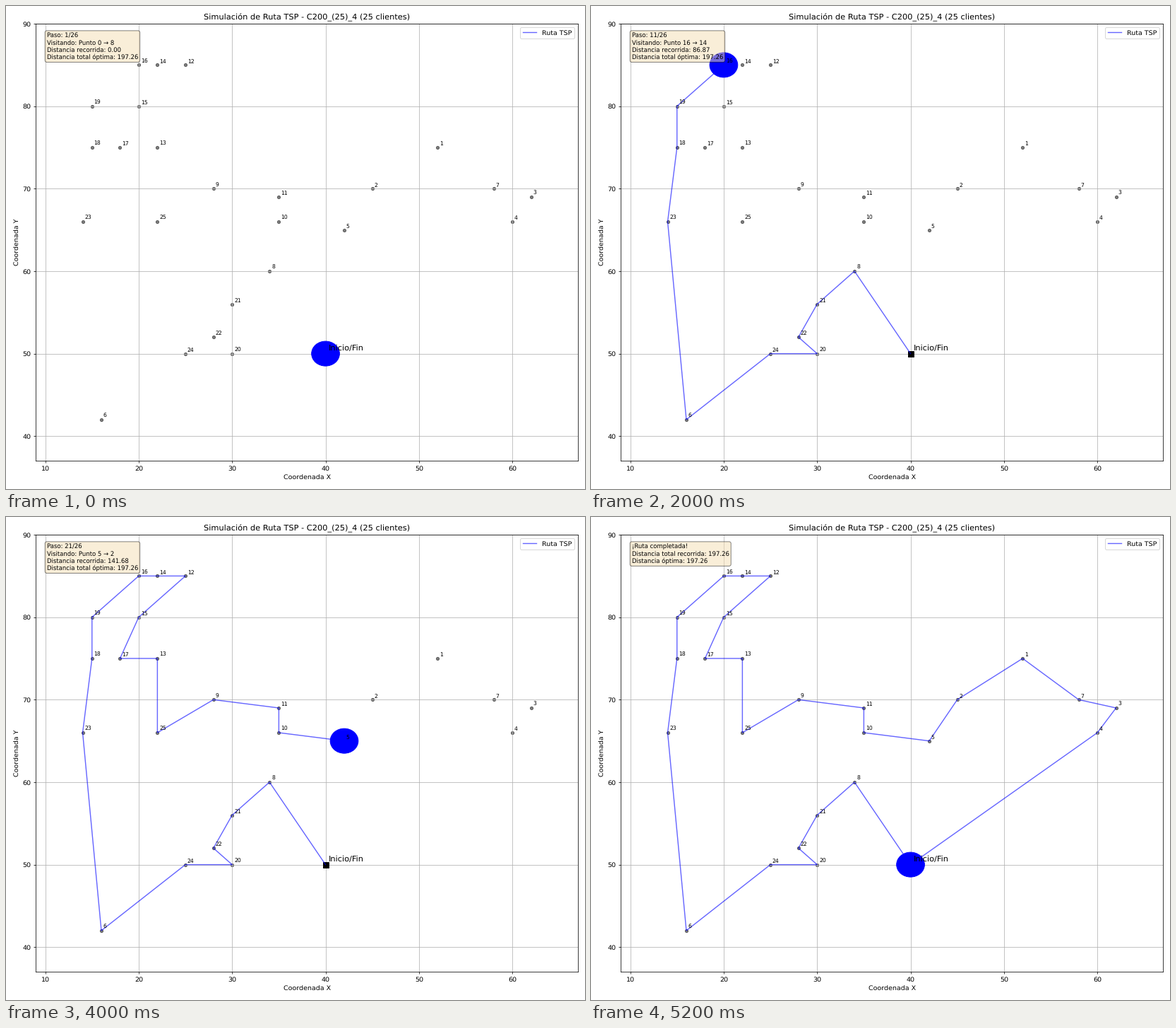
These frames come from a looping animation (820x683 px, 5400 ms). A matplotlib script:

```python
import numpy as np
import matplotlib.pyplot as plt
from matplotlib.animation import FuncAnimation
from matplotlib.patches import Circle

W, H = 820, 683
DPI = W / 12
STEP_MS = 200

# Index 0 is the depot, the rest are clients 1..25.
POINTS = np.array([
    (40, 50), (52, 75), (45, 70), (62, 69), (60, 66), (42, 65), (16, 42),
    (58, 70), (34, 60), (28, 70), (35, 66), (35, 69), (25, 85), (22, 75),
    (22, 85), (20, 80), (20, 85), (18, 75), (15, 75), (15, 80), (30, 50),
    (30, 56), (28, 52), (14, 66), (25, 50), (22, 66),
])
ROUTE = [0, 8, 21, 22, 20, 24, 6, 23, 18, 19, 16, 14, 12, 15,
         17, 13, 25, 9, 11, 10, 5, 2, 1, 7, 3, 4, 0]
PATH = POINTS[ROUTE]
LEGS = np.hypot(*np.diff(PATH, axis=0).T)
TRAVELLED = np.concatenate([[0], np.cumsum(LEGS)])
TOTAL = TRAVELLED[-1]
STEPS = len(LEGS)

plt.rcParams["font.family"] = "DejaVu Sans"
plt.rcParams["text.hinting"] = "none"

fig = plt.figure(figsize=((W + 0.01) / DPI, (H + 0.01) / DPI), dpi=DPI)
left, right, top, bottom = 42.4, 809.76, 25.1, 643.2
ax = fig.add_axes([left / W, 1 - bottom / H, (right - left) / W, (bottom - top) / H])
ax.set(xlim=(9, 67), ylim=(37, 90), xlabel="Coordenada X", ylabel="Coordenada Y")
ax.set_title("Simulación de Ruta TSP - C200_(25)_4 (25 clientes)")
ax.grid(True)


def label(text, xy, offset, size):
    ax.annotate(text, xy, xytext=(offset, offset),
                textcoords="offset points", fontsize=size)


ax.scatter(*POINTS[1:].T, c="black", s=20, alpha=0.5)
for i, xy in enumerate(POINTS[1:], 1):
    label(str(i), xy, 3, 8)
ax.plot(*POINTS[0], "ks", markersize=8)
label("Inicio/Fin", POINTS[0], 5, 12)

line, = ax.plot([], [], "b-", lw=1.5, alpha=0.6, label="Ruta TSP")
vehicle = ax.add_patch(Circle(PATH[0], 1.5, color="blue", zorder=2.5))
info = ax.text(0.02, 0.98, "", transform=ax.transAxes, va="top", fontsize=9,
               bbox=dict(boxstyle="round", facecolor="wheat", alpha=0.5))
ax.legend(loc="upper right")


def status(k):
    if k == STEPS:
        return ("¡Ruta completada!\n"
                f"Distancia total recorrida: {TOTAL:.2f}\n"
                f"Distancia óptima: {TOTAL:.2f}")
    return (f"Paso: {k + 1}/{STEPS}\n"
            f"Visitando: Punto {ROUTE[k]} → {ROUTE[k + 1]}\n"
            f"Distancia recorrida: {TRAVELLED[k]:.2f}\n"
            f"Distancia total óptima: {TOTAL:.2f}")


def update(k):
    line.set_data(*PATH[:k + 1].T)
    vehicle.center = tuple(PATH[k])
    info.set_text(status(k))
    return line, vehicle, info


anim = FuncAnimation(fig, update, frames=STEPS + 1, interval=STEP_MS,
                     init_func=lambda: update(0), repeat=True, repeat_delay=0)
plt.show()
```
